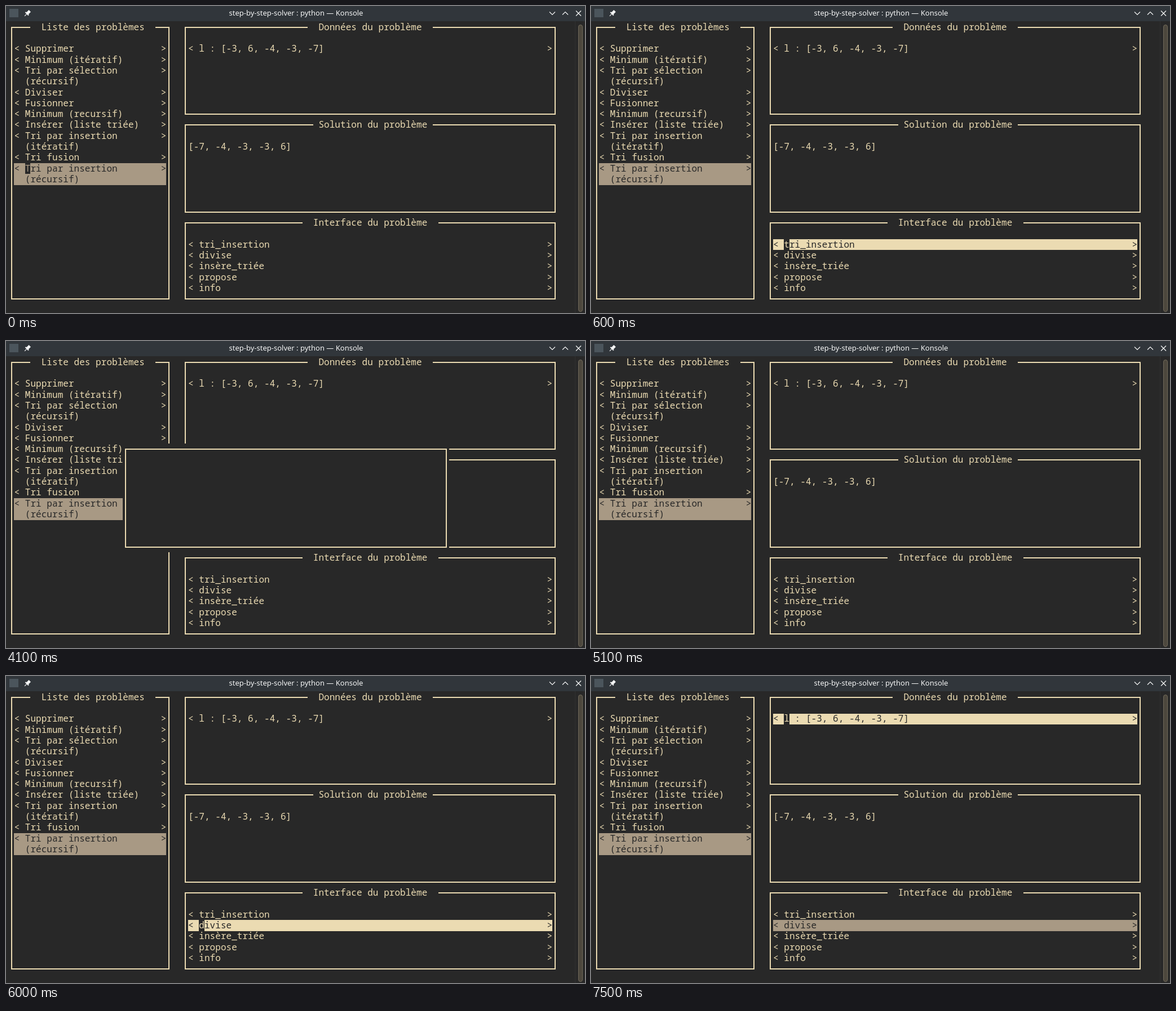
These frames come from a looping animation (1027 px wide and 545 px high, 8 s). An HTML page with a canvas:

```html
<!DOCTYPE html>
<html lang="fr">
<head>
<meta charset="utf-8">
<title>step-by-step-solver</title>
<style>
  html, body { margin: 0; width: 100%; height: 100%; overflow: hidden; background: #282828; }
  canvas { display: block; }
</style>
</head>
<body>
<canvas id="stage" width="1027" height="545"></canvas>
<script>
const ctx = document.getElementById('stage').getContext('2d');
const LOOP = 8000;
const BG = '#282828', FG = '#ebdbb2', DIM = '#a89984';
const CELL_W = 9.642, CELL_H = 19.3;

const colX = c => 4.85 + c * CELL_W;
const rowY = r => 28 + r * CELL_H;

const problems = [
  'Supprimer', 'Minimum (itératif)', 'Tri par sélection\n(récursif)', 'Diviser',
  'Fusionner', 'Minimum (recursif)', 'Insérer (liste triée)',
  'Tri par insertion\n(itératif)', 'Tri fusion', 'Tri par insertion\n(récursif)'
];
const actions = ['tri_insertion', 'divise', 'insère_triée', 'propose', 'info'];

// Focused widget, chosen action and dialog from each start time on.
const steps = [
  { at: 0, focus: 'problems' },
  { at: 600, focus: 'actions', action: 0 },
  { at: 3000, focus: 'data', action: 0 },
  { at: 4100, dialog: true },
  { at: 5100 },
  { at: 5700, focus: 'actions', action: 0 },
  { at: 6000, focus: 'actions', action: 1 },
  { at: 7500, focus: 'data', action: 1 }
];

function rect(x0, y0, x1, y1, color) {
  ctx.fillStyle = color;
  ctx.fillRect(x0, y0, x1 - x0, y1 - y0);
}

function fillCells(c0, r0, c1, r1, color) {
  rect(Math.round(colX(c0)), Math.round(rowY(r0)), Math.round(colX(c1)), Math.round(rowY(r1)), color);
}

// Terminal text: one glyph per cell.
function print(text, col, row, color = FG) {
  ctx.font = '16.07px "Noto Sans Mono", "DejaVu Sans Mono", monospace';
  ctx.textAlign = 'left';
  ctx.fillStyle = color;
  const y = Math.round(rowY(row) + 14.7);
  [...text].forEach((ch, i) => {
    if (ch !== ' ') ctx.fillText(ch, colX(col + i), y);
  });
}

function stroke(points, color, width) {
  ctx.strokeStyle = color;
  ctx.lineWidth = width;
  ctx.beginPath();
  points.forEach(([x, y]) => ctx.lineTo(x, y));
  ctx.stroke();
}

function frame(c0, r0, c1, r1, title = '', titleCol = c0 + 2, gapL = 0, gapR = gapL) {
  const mid = (f, n) => Math.round(f(n + 0.5));
  const x0 = mid(colX, c0), x1 = mid(colX, c1);
  const y0 = mid(rowY, r0), y1 = mid(rowY, r1);
  const left = Math.round(colX(titleCol - gapL));
  const right = Math.round(colX(titleCol + title.length + gapR));
  stroke([[left, y0], [x0, y0], [x0, y1], [x1, y1], [x1, y0], [right, y0]], FG, 2);
  print(title, titleCol, r0);
}

function button(label, c0, c1, row, back, cursor) {
  const lines = label.split('\n');
  const ink = back ? BG : FG;
  if (back) fillCells(c0, row, c1, row + lines.length, back);
  print('<', c0, row, ink);
  print('>', c1 - 1, row, ink);
  lines.forEach((line, i) => print(line, c0 + 2, row + i, ink));
  if (cursor) {
    fillCells(c0 + 2, row, c0 + 3, row + 1, BG);
    print(label[0], c0 + 2, row, back);
  }
  return row + lines.length;
}

function titleBar() {
  const white = '#f4f5f5';
  rect(0, 0, 1027, 27, '#31363b');
  rect(6, 5, 22, 20, '#4b555c');
  ctx.font = '13px "Noto Sans", sans-serif';
  ctx.textAlign = 'center';
  ctx.fillStyle = white;
  ctx.fillText('step-by-step-solver : python — Konsole', 514.5, 17);

  // Pin
  ctx.save();
  ctx.translate(38, 13);
  ctx.rotate(Math.PI / 4);
  rect(-2.5, -6, 2.5, 1, white);
  rect(-4, 0, 4, 2, white);
  rect(-0.6, 2, 0.6, 7, white);
  ctx.restore();

  stroke([[964, 10.5], [969, 15.5], [974, 10.5]], white, 1.2);
  stroke([[987, 15.5], [992, 10.5], [997, 15.5]], white, 1.2);
  stroke([[1011, 8.5], [1020, 17.5]], white, 1.2);
  stroke([[1011, 17.5], [1020, 8.5]], white, 1.2);
}

function scrollBar() {
  rect(1009, 27, 1010, 545, '#303030');
  ctx.beginPath();
  ctx.roundRect(1015.5, 33.5, 7, 509, 3.5);
  ctx.fillStyle = '#4c473d';
  ctx.fill();
  ctx.strokeStyle = '#70695a';
  ctx.lineWidth = 1;
  ctx.stroke();
}

function draw(step) {
  rect(0, 0, 1027, 545, BG);
  titleBar();
  scrollBar();

  frame(0, 0, 29, 25, 'Liste des problèmes', 6, 2);
  let row = 2;
  problems.forEach((label, i) => {
    const chosen = i === problems.length - 1;
    row = button(label, 1, 29, row, chosen && DIM, chosen && step.focus === 'problems');
  });

  const onData = step.focus === 'data';
  frame(32, 0, 100, 8, 'Données du problème', 57, 2);
  button('l : [-3, 6, -4, -3, -7]', 33, 100, 2, onData && FG, onData);

  frame(32, 9, 100, 17, 'Solution du problème', 57, 1);
  print('[-7, -4, -3, -3, 6]', 33, 11);

  const onActions = step.focus === 'actions';
  frame(32, 18, 100, 25, 'Interface du problème', 56, 2);
  actions.forEach((label, i) => {
    const chosen = i === step.action;
    button(label, 33, 100, 20 + i, chosen && (onActions ? FG : DIM), chosen && onActions);
  });

  if (step.dialog) {
    fillCells(21, 8, 81, 18, BG);
    frame(21, 8, 80, 17);
  }
}

const start = performance.now();
function tick() {
  const t = (performance.now() - start) % LOOP;
  draw(steps.filter(s => s.at <= t).pop());
  requestAnimationFrame(tick);
}
tick();
</script>
</body>
</html>
```
